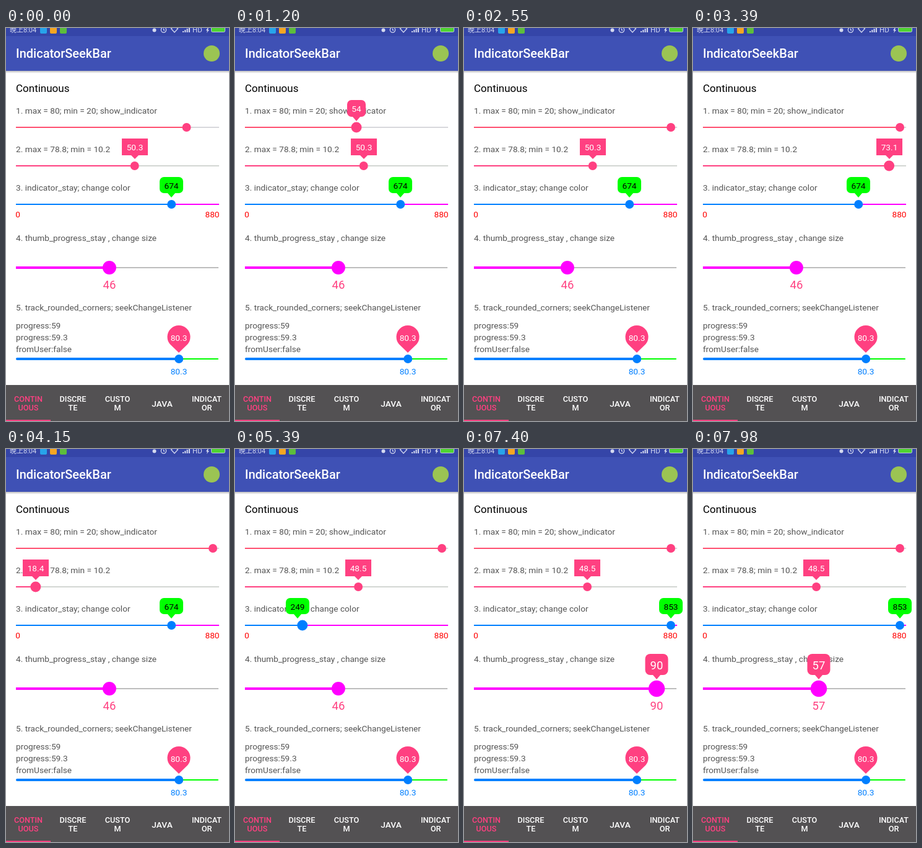
Write an HTML page that moves like this. It is 360x633 px and loops after 8 s.

```html
<!DOCTYPE html>
<html lang="en">
<head>
<meta charset="utf-8">
<title>IndicatorSeekBar</title>
<style>
  html, body { margin: 0; width: 100%; height: 100%; overflow: hidden; background: #fff; }
  svg { display: block; width: 360px; height: 633px; font: 13.7px Roboto, sans-serif; }
  .note { fill: #555; }
  .mid { text-anchor: middle; }
  .tabs { font-size: 12.7px; font-weight: 500; fill: #fff; text-anchor: middle; }
</style>
</head>
<body>
<svg id="stage" viewBox="0 0 360 633">
  <defs>
    <linearGradient id="shade" x2="0" y2="1">
      <stop stop-color="#000" stop-opacity=".26"/>
      <stop offset="1" stop-color="#000" stop-opacity="0"/>
    </linearGradient>
  </defs>
  <rect width="360" height="633" fill="#fff"/>

  <rect y="69" width="360" height="4" fill="url(#shade)"/>
  <rect width="360" height="69" fill="#3f51b5"/>
  <rect width="360" height="13" fill="#3545a8"/>
  <g fill="#d5daf0">
    <text x="6" y="7" font-size="11" font-family="Roboto, 'Noto Sans CJK SC', 'Noto Sans CJK', sans-serif">晚上8:04</text>
    <text x="301" y="7" font-size="11.5">HD</text>
    <circle cx="239.5" cy="3.5" r="3"/>
    <path d="M285 7v-2h2v2zm3.300 0v-4h2v4zm3.300 0v-6h2v6zm3.300 0v-8h2v8z"/>
    <path d="M326 -1l-3 5h2l-1 4 4-5h-2l1-4z"/>
  </g>
  <g fill="none" stroke="#d5daf0" stroke-width="1.2">
    <circle cx="254.5" cy="3" r="4.200"/>
    <path d="M254.500 .5v3h2M266.500 1q5.500-4 11 0l-5.500 6z"/>
  </g>
  <rect x="55" y="-2" width="11" height="11" rx="2" fill="#27a4ea"/>
  <rect x="71" y="-2" width="11" height="11" rx="2" fill="#f5a623"/>
  <rect x="87" y="-2" width="11" height="11" rx="2" fill="#5cbd3c"/>
  <rect x="331.5" y="-3" width="22" height="9.5" rx="2" fill="#4fd432" stroke="#b9c3e6"/>
  <text x="16" y="48" font-size="20" font-weight="500" fill="#fff">IndicatorSeekBar</text>
  <circle cx="332" cy="41" r="13" fill="#9bc453"/>

  <text x="16" y="103" font-size="17">Continuous</text>
  <g class="note">
    <text x="16" y="138">1. max = 80; min = 20; show_indicator</text>
    <text x="16" y="200">2. max = 78.8; min = 10.2</text>
    <text x="16" y="261.5">3. indicator_stay; change color</text>
    <text x="16" y="343">4. thumb_progress_stay , change size</text>
    <text x="16" y="455">5. track_rounded_corners; seekChangeListener</text>
    <text x="16" y="484">progress:59</text>
    <text x="16" y="502.5">progress:59.3</text>
    <text x="16" y="521.5">fromUser:false</text>
  </g>
  <g class="mid" fill="#f00">
    <text x="19" y="305">0</text>
    <text x="333" y="305">880</text>
  </g>

  <g id="bars"></g>

  <path d="M279 523L264.500 509A18.500 18.500 0 1 1 293.500 509Z" fill="#ff4081"/>
  <text class="mid" x="279" y="503.5" fill="#fff">80.3</text>
  <text class="mid" x="279" y="558" fill="#007fff">80.3</text>

  <rect y="575" width="360" height="58" fill="#535153"/>
  <rect y="631" width="72" height="2" fill="#ff4081"/>
  <g class="tabs">
    <g fill="#ff4081"><text x="36" y="602">CONTIN</text><text x="36" y="616">UOUS</text></g>
    <text x="108" y="602">DISCRE</text><text x="108" y="616">TE</text>
    <text x="180" y="602">CUSTO</text><text x="180" y="616">M</text>
    <text x="252" y="609.5" font-size="13.7">JAVA</text>
    <text x="324" y="602">INDICAT</text><text x="324" y="616">OR</text>
  </g>
</svg>
<script>
const LOOP = 8000, LEFT = 16, SPAN = 328;
const PINK = '#ff4081', BLUE = '#007fff', MAGENTA = '#ff00ff';

// Evenly timed positions of one finger movement
const drag = (from, to, ...xs) => xs.map((x, i) =>
  [Math.floor((from + (to - from) * i / (xs.length - 1)) / 10) * 10, x]);

const always = [0, LOOP];

// r: thumb radius idle/pressed; lag: text behind thumb; lead: bubble ahead of thumb
const bars = [
  { y: 160, track: '#d8d8dc', fill: '#ff5070', thumb: PINK, r: [7, 8.5], min: 20, max: 80,
    press: [480, 2550], lag: .15,
    tip: { w: 30, top: 116, h: 27, rx: 7, point: 150, show: [910, 2550], ink: '#fff', base: 135 },
    steps: [[0, 291.5],
      ...drag(910, 1580, 288, 272, 240, 196, 146, 96, 52, 23),
      ...drag(1790, 2550, 34, 76, 134, 190, 240, 284, 316, 338, 334)] },
  { y: 222, track: '#d3d6d3', fill: PINK, thumb: PINK, r: [7, 8.5], min: 10.2, max: 78.8, digits: 1,
    press: [2730, 4820], lag: .15,
    tip: { w: 42, top: 178, h: 27, rx: 0, point: 211, show: always, ink: '#fff', base: 197 },
    steps: [[0, 207.7],
      ...drag(2730, 2920, 322, 330, 332),
      ...drag(3220, 3390, 325, 319, 316.6),
      ...drag(3480, 3960, 306, 291, 272, 249, 221, 187, 148),
      ...drag(4060, 4820, 97, 47.8, 25, 24, 52, 104, 158, 199.1, 199.1)] },
  { y: 284, track: MAGENTA, fill: BLUE, thumb: BLUE, r: [7, 8.5], min: 0, max: 880,
    press: [4970, 6890], lead: .2,
    tip: { w: 38, top: 240, h: 26, rx: 7, point: 273, show: always, color: '#00ff00', ink: '#000', base: 259 },
    steps: [[0, 267.2],
      ...drag(4970, 5390, 262, 246, 222, 190, 152, 108.8),
      ...drag(5490, 5770, 69, 46, 30, 24),
      ...drag(5870, 6630, 24, 26, 40, 74, 128, 190, 252, 305.6, 320),
      [6720, 333.94]] },
  { y: 386, track: '#bdbdbd', fill: MAGENTA, thumb: MAGENTA, thick: 4, end: 343, r: [11, 13.2], min: 0, max: 100,
    press: [7140, LOOP], label: 420,
    tip: { w: 37, top: 330, h: 34, rx: 8, point: 371, show: [7300, LOOP], ink: '#fff', base: 354.5, size: 18.5 },
    steps: [[0, 166.9], [7140, 318],
      ...drag(7300, 7980, 318, 311, 299, 283, 264, 244, 223, 203)] },
  { y: 533, track: '#00ff00', fill: BLUE, thumb: BLUE, thick: 4, end: 342, cap: 'round', r: [7, 7], min: 0, max: 100,
    press: [LOOP, LOOP], steps: [[0, 279.2]] }
];

function add(parent, tag, attrs) {
  const el = document.createElementNS('http://www.w3.org/2000/svg', tag);
  for (const key in attrs) el.setAttribute(key, attrs[key]);
  return parent.appendChild(el);
}

function build(bar) {
  const { y, tip, cap = 'butt', thick = 2 } = bar;
  const g = add(document.getElementById('bars'), 'g', {});
  const inset = cap === 'round' ? thick / 2 : 0;
  const line = (stroke, width) => add(g, 'line', {
    x1: LEFT + inset, x2: bar.end || LEFT + SPAN, y1: y, y2: y,
    stroke, 'stroke-width': width, 'stroke-linecap': cap });
  line(bar.track, 2);
  bar.lineEl = line(bar.fill, thick);
  bar.thumbEl = add(g, 'circle', { cy: y, fill: bar.thumb });
  if (bar.label) {
    bar.labelEl = add(g, 'text', { y: bar.label, fill: PINK, class: 'mid', 'font-size': 18.5 });
  }
  if (tip) {
    const foot = tip.top + tip.h;
    bar.tipEl = add(g, 'g', { fill: tip.color || PINK });
    add(bar.tipEl, 'rect', { x: -tip.w / 2, y: tip.top, width: tip.w, height: tip.h, rx: tip.rx });
    add(bar.tipEl, 'path', { d: `M-6.500 ${foot - .5}H6.500L0 ${tip.point}Z` });
    bar.textEl = add(bar.tipEl, 'text', { y: tip.base, fill: tip.ink, class: 'mid', 'font-size': tip.size || 13.7 });
  }
}

const within = (t, [from, to]) => t >= from && t < to;

function draw(bar, t) {
  const { steps, min, max, digits = 0, lag = 0, lead = 0, tip } = bar;
  let i = steps.length - 1;
  while (steps[i][0] > t) i--;
  const at = k => steps[Math.max(0, Math.min(steps.length - 1, k))][1];
  const x = at(i), pressed = within(t, bar.press);
  const textX = x + lag * (at(i - 1) - x);
  const tipX = Math.round(pressed ? x + lead * (at(i + 1) - x) : x);
  const value = (min + (textX - LEFT) / SPAN * (max - min)).toFixed(digits);

  bar.lineEl.setAttribute('x2', x);
  bar.thumbEl.setAttribute('cx', x);
  bar.thumbEl.setAttribute('r', bar.r[+pressed]);
  if (bar.labelEl) {
    bar.labelEl.setAttribute('x', x);
    bar.labelEl.textContent = value;
  }
  if (tip) {
    bar.tipEl.setAttribute('transform', `translate(${tipX} 0)`);
    bar.tipEl.setAttribute('visibility', within(t, tip.show) ? 'visible' : 'hidden');
    bar.textEl.textContent = value;
  }
}

bars.forEach(build);
const start = performance.now();
function frame() {
  const t = (performance.now() - start) % LOOP;
  bars.forEach(bar => draw(bar, t));
  requestAnimationFrame(frame);
}
frame();
</script>
</body>
</html>
```
